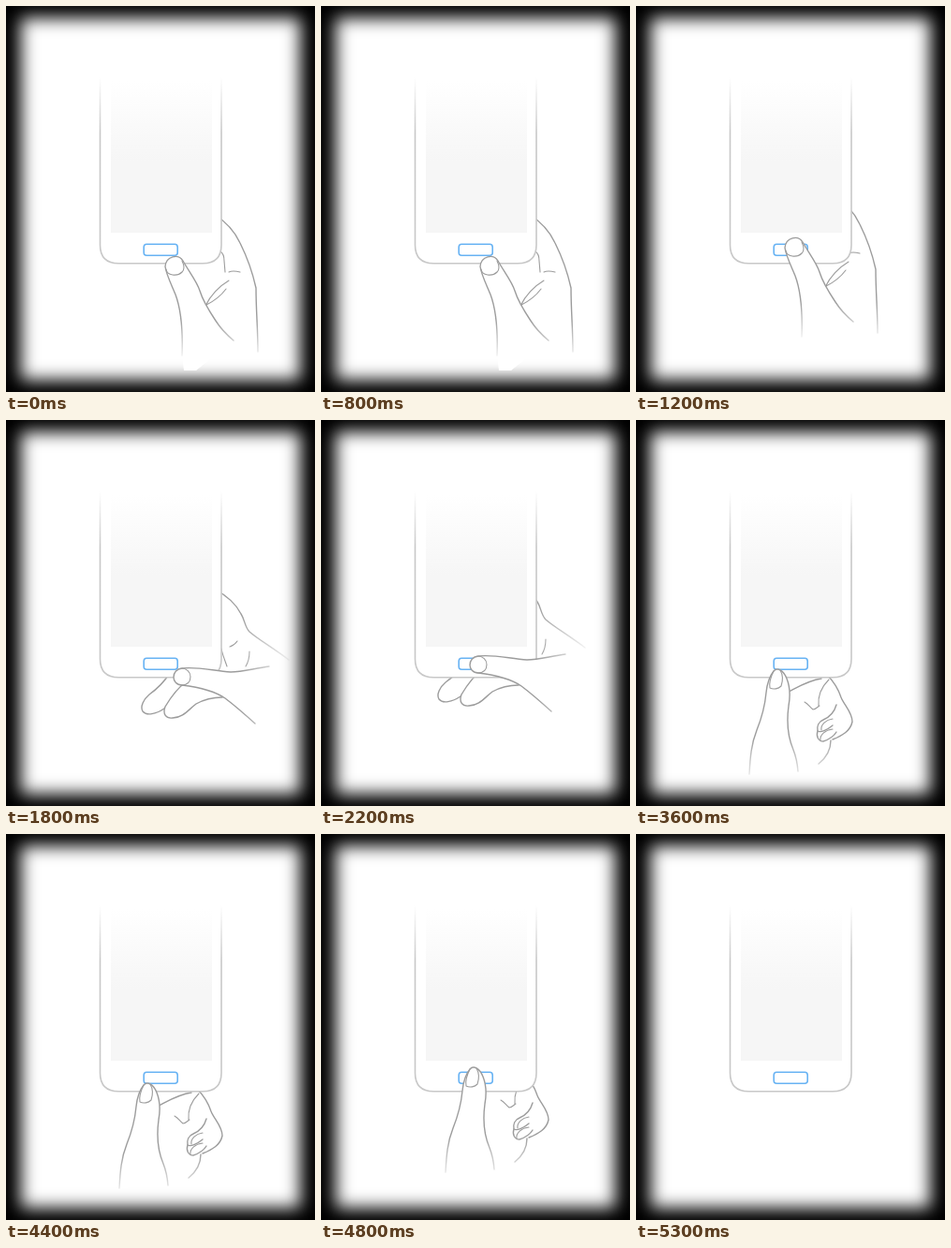
An HTML page for the animation above (5.4 s loop, 330 by 412 pixels).

```html
<!DOCTYPE html>
<html lang="en">
<head>
<meta charset="utf-8">
<title>Phone grip</title>
<style>
  html, body { margin: 0; width: 100%; height: 100%; overflow: hidden; background: #000; }
  svg { display: block; width: 330px; height: 412px; }
  .glow { fill: #fff; filter: blur(9px); }
  .hand { fill: none; stroke-width: 1.4; stroke-linecap: round; stroke-linejoin: round; opacity: 0; }
  .skin { fill: #fff; stroke: none; }
  .thin { stroke-width: 1.1; }
  .one { stroke: url(#fade1); }
  .two { stroke: url(#fade2); }
  .three { stroke: url(#fade3); }
</style>
</head>
<body>
<svg viewBox="0 0 330 412">
  <defs>
    <linearGradient id="edge" gradientUnits="userSpaceOnUse" x1="0" y1="76" x2="0" y2="135">
      <stop stop-color="#c8c8c8" stop-opacity="0"/><stop offset="1" stop-color="#c8c8c8"/>
    </linearGradient>
    <linearGradient id="screen" gradientUnits="userSpaceOnUse" x1="0" y1="80" x2="0" y2="165">
      <stop stop-color="#fff"/><stop offset="1" stop-color="#f6f6f6"/>
    </linearGradient>
    <linearGradient id="fade1" gradientUnits="userSpaceOnUse" x1="0" y1="335" x2="0" y2="376">
      <stop stop-color="#9c9c9c"/><stop offset="1" stop-color="#9c9c9c" stop-opacity=".1"/>
    </linearGradient>
    <linearGradient id="fade2" gradientUnits="userSpaceOnUse" x1="250" y1="0" x2="304" y2="0">
      <stop stop-color="#9c9c9c"/><stop offset="1" stop-color="#9c9c9c" stop-opacity=".1"/>
    </linearGradient>
    <linearGradient id="fade3" gradientUnits="userSpaceOnUse" x1="0" y1="340" x2="0" y2="381">
      <stop stop-color="#9c9c9c"/><stop offset="1" stop-color="#9c9c9c" stop-opacity=".2"/>
    </linearGradient>
  </defs>

  <rect class="glow" x="16" y="13" width="298" height="386"/>

  <!-- palms and fingers behind the phone -->
  <g class="hand one">
    <path d="M222 222C233 229 244 240 250 253C257 267 263 283 267 301C267 325 269 345 269 369"/>
    <path class="thin" d="M229 262C232 264 233 267 233 272L234 284M238 284C242 282 246 283 250 284"/>
    <path class="thin" d="M213 320C219 308 228 299 238 293M214 319C222 315 229 310 235 302"/>
  </g>
  <g class="hand two">
    <path d="M222 180C235 187 245 195 251 207C255 213 255 221 260 226C269 234 285 243 302 256"/>
    <path class="thin" d="M260 247C260 253 259 258 256 263M239 242C242 241 245 239 247 236M230 244C231 250 234 257 236 263"/>
    <path d="M175 270C168 281 160 288 153 293C147 298 143 306 146 311C150 316 160 314 169 308L181 295"/>
    <path fill="#fff" d="M192 280C183 286 176 296 170 306C167 314 171 319 178 318C189 318 195 309 203 303C212 298 220 296 231 296"/>
  </g>
  <g class="hand three">
    <path d="M163 290C173 285 184 278 198 276"/>
    <path d="M204 272C212 280 216 287 219 296C222 304 231 312 231 322C229 332 220 337 210 341"/>
    <path d="M208 342C208 350 205 359 195 367"/>
    <path class="thin" d="M180 301C184 303 186 307 189 309C192 309 194 306 196 305M195 305C194 294 198 285 206 277"/>
    <path d="M214 304C212 311 207 317 200 320C195 322 193 327 194 332C197 334 204 331 210 326"/>
    <path d="M194 332C192 338 195 343 200 343C206 341 211 338 214 333"/>
    <path class="thin" d="M198 331C197 325 203 320 210 319M197 342C196 336 202 331 210 330"/>
  </g>

  <!-- phone -->
  <path d="M100.5 76V255Q100.5 274.8 120.5 274.8H210Q230 274.8 230 255V76" fill="#fff" stroke="url(#edge)" stroke-width="1.6"/>
  <rect x="112" y="80" width="108" height="162" fill="url(#screen)"/>
  <rect x="147.2" y="254.2" width="36" height="12" rx="3" fill="#fff" stroke="#68b3f3" stroke-width="1.6"/>

  <!-- thumbs in front -->
  <g class="hand one">
    <path class="skin" d="M188 373C189 345 187 324 181 308C176 296 171 286 170 278C171 267 184 264 189 272C195 283 204 294 207 304C210 314 216 324 224 336Q231 347 243 357L203 389H190Z"/>
    <path d="M188 373C189 345 187 324 181 308C176 296 171 286 170 278C171 267 184 264 189 272C195 283 204 294 207 304C210 314 216 324 224 336Q231 347 243 357"/>
    <path class="thin" d="M171 281C172 288 183 289 188 284C191 281 190 276 188 272"/>
  </g>
  <g class="hand two">
    <path class="skin" d="M281 263C265 265 253 269 240 269C222 268 206 263 188 265C176 266 176 283 188 283C204 285 221 288 234 297C246 306 256 315 266 324Z"/>
    <path d="M281 263C265 265 253 269 240 269C222 268 206 263 188 265C176 266 176 283 188 283C204 285 221 288 234 297C246 306 256 315 266 324"/>
    <path class="thin" d="M187 265C193 265 197 269 197 274C197 280 193 283 187 283"/>
  </g>
  <g class="hand three">
    <path class="skin" d="M121 378C122 360 123 346 129 331C135 316 138 302 139 291C140 281 143 273 147 268C151 263 158 268 161 276C165 286 165 294 163 305C161 320 162 338 168 352Q172 362 173 375Z"/>
    <path d="M121 378C122 360 123 346 129 331C135 316 138 302 139 291C140 281 143 273 147 268C151 263 158 268 161 276C165 286 165 294 163 305C161 320 162 338 168 352Q172 362 173 375"/>
    <path class="thin" d="M147 268C144 274 142 281 143 286C147 288 152 287 155 284C157 278 157 272 154 267"/>
  </g>
</svg>
<script>
  const LOOP = 5400, TAP = 400;
  const hands = [
    { name: "one", start: 0, end: 1600, tap: [-11, -20] },
    { name: "two", start: 1800, end: 3400, tap: [-20, -13] },
    { name: "three", start: 3600, end: 5200, tap: [12, -17] }
  ];

  // Rest and tap alternate, then one dimmed step before the hand is gone.
  function steps({ start, end, tap }) {
    const key = (time, opacity, [x, y]) => ({
      offset: time / LOOP, opacity, transform: `translate(${x}px, ${y}px)`, easing: "step-end"
    });
    const rest = [0, 0];
    const keys = start ? [key(0, 0, rest)] : [];
    for (let t = start, n = 0; t < end; t += TAP, n++) keys.push(key(t, 1, n % 2 ? tap : rest));
    keys.push(key(end, 0.5, tap), key(end + 100, 0, tap), key(LOOP, 0, rest));
    return keys;
  }

  for (const hand of hands) {
    for (const part of document.querySelectorAll(".hand." + hand.name)) {
      part.animate(steps(hand), { duration: LOOP, iterations: Infinity });
    }
  }
</script>
</body>
</html>
```
